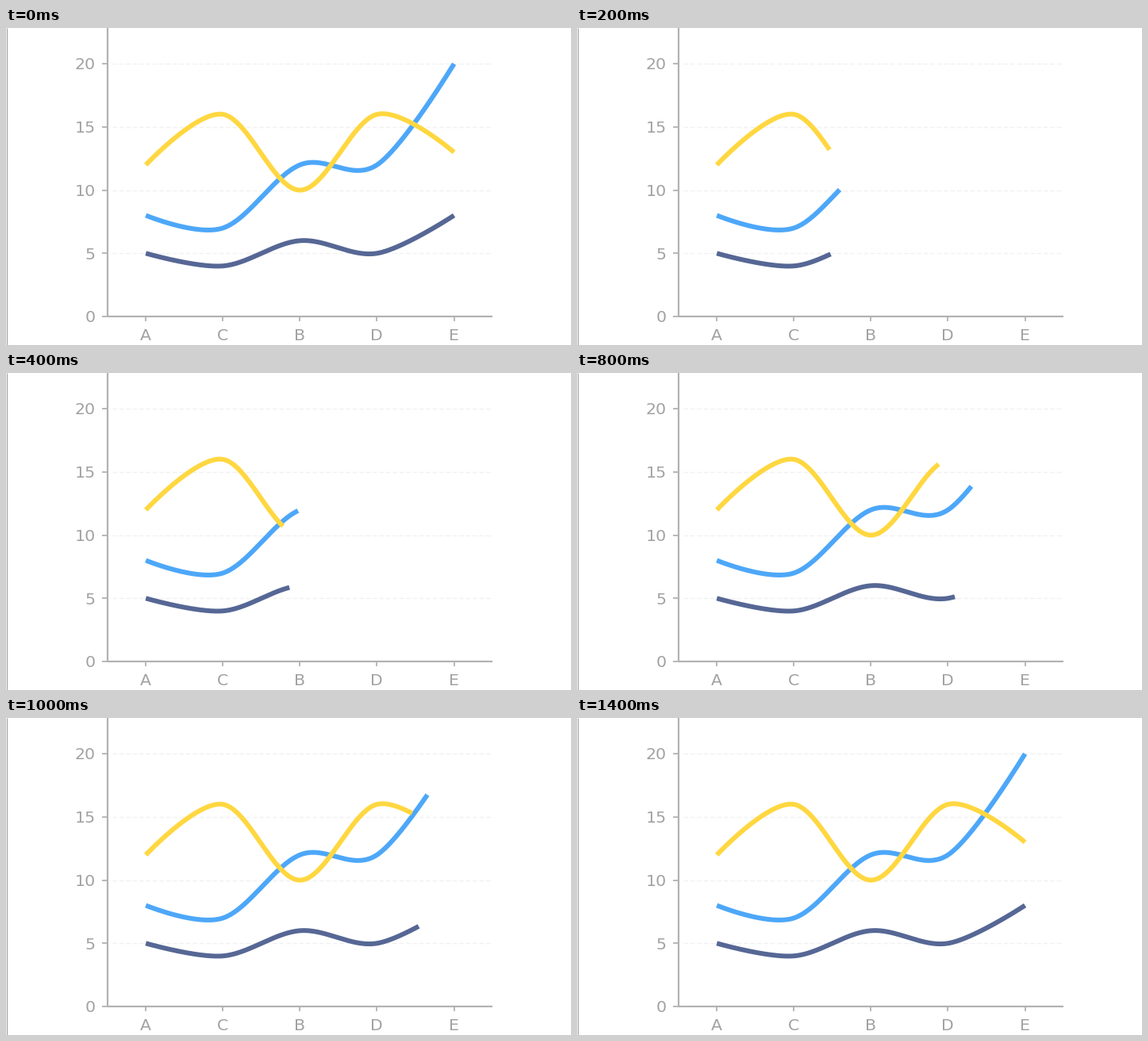
These frames come from a looping animation (712 px wide and 400 px high, 1.5 s). A matplotlib script:

```python
import numpy as np
import matplotlib.pyplot as plt
from matplotlib.animation import FuncAnimation

W, H, DPI = 712, 400, 100
PX = 72 / DPI                      # one pixel in points
X0, STEP, BASE, UNIT = 176.2, 97.1, 364.0, 15.94
AXIS_X, RIGHT = 127.5, 612.5
GREY, LABEL = "#b2b2b2", "#a2a2a2"

BLUE, NAVY, YELLOW = "#4da7f8", "#566795", "#ffd740"
SERIES = [
    (BLUE, [8, 7, 12, 12, 20]),
    (NAVY, [5, 4, 6, 5, 8]),
    (YELLOW, [12, 16, 10, 16, 13]),
]

# Start of each hold (in frames) and the x the blue line has reached by then.
STARTS = [0, 1, 2, 4, 6, 8, 10, 12, 14]
REACH = [565, 294, 331, 368, 416, 497, 531, 557, 565]


def spline(values, n=80):
    """Catmull-Rom curve through evenly spaced values, at rest at both ends."""
    x = X0 + STEP * np.arange(len(values))
    pts = np.column_stack([x, BASE - UNIT * np.array(values)])
    slope = np.zeros_like(pts)
    slope[1:-1] = (pts[2:] - pts[:-2]) / 2
    t = np.linspace(0, 1, n, endpoint=False)[:, None]
    parts = []
    for a, b, m0, m1 in zip(pts, pts[1:], slope, slope[1:]):
        parts.append((2*t**3 - 3*t**2 + 1) * a + (t**3 - 2*t**2 + t) * m0
                     + (3*t**2 - 2*t**3) * b + (t**3 - t**2) * m1)
    return np.vstack(parts + [pts[-1:]])


def progress(path):
    """Share of the path length covered at each point."""
    run = np.hypot(*np.diff(path, axis=0).T).cumsum()
    return np.concatenate([[0], run / run[-1]])


def cut(path, share, p):
    """The path from its start up to the share p of its length."""
    tip = [np.interp(p, share, path[:, k]) for k in (0, 1)]
    return np.vstack([path[share < p], tip])


fig = plt.figure(figsize=(W / DPI, H / DPI), dpi=DPI, facecolor="white")
ax = fig.add_axes([0, 0, 1, 1])
ax.set_xlim(0, W)
ax.set_ylim(H, 0)
ax.axis("off")


def stroke(x, y, color=GREY, width=1.8, **kw):
    kw.setdefault("solid_capstyle", "butt")
    return ax.plot(x, y, color=color, lw=width * PX, **kw)[0]


def label(x, y, text, align):
    ax.text(x, y, text, ha=align, va="baseline", color=LABEL,
            family="DejaVu Sans", size=20.5 * PX)


for x in (0.5, W - 0.5):
    stroke([x, x], [0, H], "#969696", 1)

for v in range(0, 21, 5):
    y = BASE - UNIT * v
    if v:
        stroke([AXIS_X + 6, RIGHT], [y, y], "#f1f1f1", 1.4, dashes=(4, 2))
    stroke([121, AXIS_X], [y, y])
    label(112.5, y + 7.2, str(v), "right")

stroke([AXIS_X, AXIS_X], [0, BASE], width=2.2)
stroke([AXIS_X, RIGHT], [BASE, BASE], width=2.2)
for i, name in enumerate("ACBDE"):
    x = X0 + STEP * i
    stroke([x, x], [BASE, BASE + 6])
    label(x - 0.5, 393.8, name, "center")

curves = []
for color, values in SERIES:
    path = spline(values)
    line = stroke([], [], color, 6, zorder=5, solid_joinstyle="round")
    curves.append((line, path, progress(path)))

_, lead, lead_share = curves[0]


def draw(frame):
    hold = np.searchsorted(STARTS, frame, side="right") - 1
    p = np.interp(REACH[hold], lead[:, 0], lead_share)
    for line, path, share in curves:
        line.set_data(*cut(path, share, p).T)
    return [c[0] for c in curves]


anim = FuncAnimation(fig, draw, frames=15, interval=100,
                     repeat=True, repeat_delay=0, blit=False)
plt.show()
```
